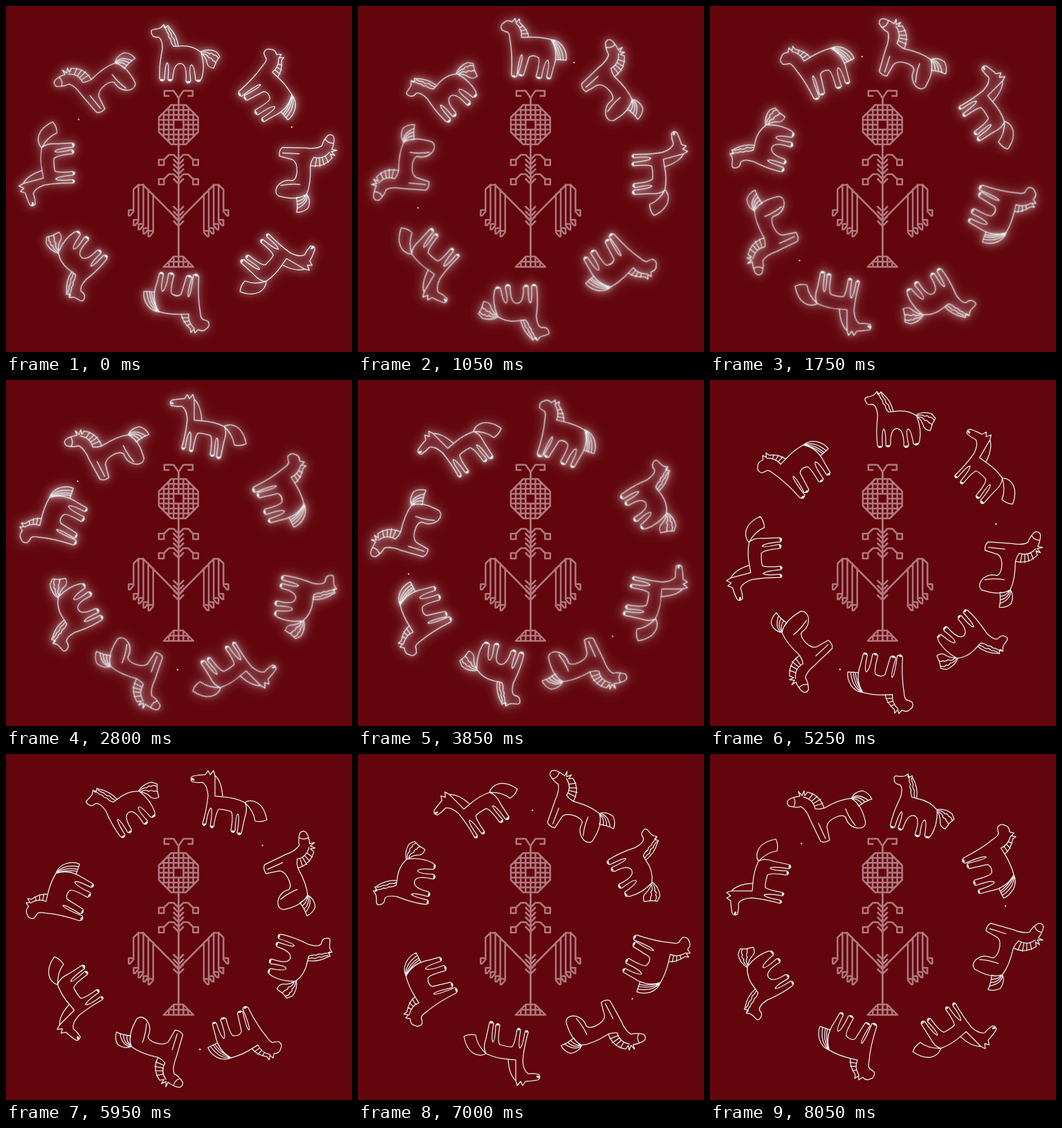
An HTML page that plays this animation: 500x500 px, repeating every 8.4 s.

```html
<!DOCTYPE html>
<html lang="en">
<head>
<meta charset="utf-8">
<title>Horse carousel</title>
<style>
  html, body { margin: 0; width: 100%; height: 100%; overflow: hidden; background: #62050c; }
  svg { display: block; width: 100vw; height: 100vh; fill: none; stroke-linecap: round; stroke-linejoin: round; }
  #herd { stroke: #e6f3f3; stroke-width: 1.25; }
  #herd.glow { filter: drop-shadow(0 0 3px #fff9) drop-shadow(0 0 8px #fffc); }
  .hoof { stroke-width: 2.8; }
  #ornament { stroke: #b0777e; stroke-width: 2.5; }
</style>
</head>
<body>
<svg viewBox="0 0 500 500">
  <g id="ornament" transform="translate(249.3 0)"></g>
  <g id="wheel">
    <g id="herd"></g>
    <circle cx="105" cy="164" r="1.1" fill="#fff"/>
    <circle cx="413" cy="175" r="1.1" fill="#fff"/>
  </g>
</svg>
<script>
const STEP = 350, STEPS = 24, GLOW_STEPS = 15;
const $ = id => document.getElementById(id);

// Each horse: pivot, outline, hooves, and its places as [x, y, rotation]
const horses = [
  { // wavy mane and tail
    pivot: [250, 70],
    lines: `M212 43Q207 35 213 34Q221 33 224 31L228 27L230 32L234 28L236 31Q247 42 249 58
      Q269 56 282 67Q288 87 283 104Q279 112 274 107Q272 85 268 85Q264 86 267 108Q264 114 260 109
      Q262 84 252 83Q242 83 241 105Q238 111 234 106Q236 84 233 82Q230 84 229 106Q225 111 222 105
      Q221 86 226 62Q226 47 220 45Q215 46 212 43
      M231 33Q232 38 235 41Q234 45 238 48Q238 53 242 58H249M234 31Q236 37 239 40Q238 44 243 48Q243 53 246 58
      M281 66Q292 61 304 66L309 73L304 80L300 90Q291 89 290 80Q288 73 283 69
      M283 67Q290 65 294 69Q298 67 300 71Q304 70 307 76M284 69Q291 69 293 75Q297 74 299 79Q302 79 303 83`,
    hooves: "M224 107h2M236 107h2M262 110h3M277 108h3M229 30l1 1",
    places: [[250, 70, 0], [101.9, 374.2, 220]]
  },
  { // broad legs, striped mane
    pivot: [168, 88],
    lines: `M112 76Q106 69 115 65Q123 62 128 62L126 55L131 61L134 54L135 61L139 56Q157 60 163 79
      Q186 66 202 65Q217 72 223 100Q222 108 212 108Q198 106 194 92Q190 88 180 92Q167 98 167 106L171 125
      Q164 130 158 127L143 96Q138 82 130 77Q122 79 112 76
      M119 64Q123 71 119 77M133 63Q147 66 150 80Q156 81 163 79
      M141 66L147 58M145 69L153 62M148 72L158 66M149 76L161 72
      M155 101L165 123M194 80Q199 93 208 104
      M202 65Q207 55 219 54Q228 57 232 66Q222 69 213 76Q210 69 202 65
      M203 64Q213 57 227 68M204 65Q214 61 222 70M205 66Q212 65 218 73`,
    hooves: "",
    places: [[429.5, 231, 117], [130.5, 113.5, -15]]
  },
  { // striped tail, legs in pairs
    pivot: [205, 80],
    lines: `M156 62Q151 56 156 51Q159 45 167 47L170 41L173 46L176 40L178 45Q192 52 196 62
      Q212 57 228 57Q244 71 242 95L242 111Q239 115 236 111Q235 88 231 87Q227 90 229 114Q225 118 221 114
      Q221 89 217 87Q208 84 204 90L203 117Q199 121 195 117Q196 90 193 89Q190 92 194 121Q190 126 186 121
      Q180 92 171 73Q167 61 162 63L156 62
      M173 47Q185 54 186 65L196 62M180 52L184 48M183 56L190 52M185 60L194 57
      M228 57Q239 55 248 63Q256 71 257 80L242 83Q240 67 228 57
      M230 57Q246 61 253 81M231 58Q244 66 249 82M231 59Q242 70 246 82`,
    hooves: "M189 122h2M198 118h2M224 115h2M238 112h2",
    places: [[381.5, 119.5, 60], [249.5, 425.8, 195]]
  },
  { // pointed muzzle, plain tail
    pivot: [315, 70],
    lines: `M269 40Q265 35 270 32Q281 30 288 30L292 24L295 30L300 24L302 31Q312 40 313 62
      Q330 63 345 70Q350 78 345 92L340 115Q337 119 334 114Q338 91 335 87Q332 87 331 111Q328 116 325 111
      Q329 87 325 83Q311 79 307 80Q303 86 300 105Q297 109 295 104Q299 81 296 78Q292 81 289 101Q286 106 284 101
      Q290 80 292 60Q291 45 284 41Q277 42 269 40
      M302 31V61L313 62M345 70Q354 65 364 71Q374 78 377 95Q370 99 360 97Q358 82 345 70`,
    hooves: "M286 102h1M297 105h1M327 112h2M336 115h2M269 36l2 1",
    places: [[391, 371.8, 120], [59.3, 233.8, 255]]
  }
];

$("herd").innerHTML = horses.map(({ pivot: [px, py], lines, hooves, places }) =>
  places.map(([x, y, turn]) =>
    `<g transform="translate(${x} ${y}) rotate(${turn}) translate(${-px} ${-py})">
      <path d="${lines}"/><path class="hoof" d="${hooves}"/></g>`).join("")).join("");

// Left half of the embroidered flower; the right half mirrors it
function halfFlower() {
  let d = "M-14 130H-20.5V122.5H-7L0 133V142";
  d += "M0 143H-10.5L-28.4 161V182L-10.5 200H0V362";
  for (let i = -3; i <= 3; i++) {
    const reach = Math.min(28.4, 39 - Math.abs(i * 7.1));
    d += `M0 ${171.5 + i * 7.1}h${-reach}`;
    if (i <= 0) d += `M${i * 7.1} ${171.5 - reach}v${2 * reach}`;
  }
  for (const y of [222, 250]) d += `M0 ${y}L-7 ${y - 7}H-14L-21 ${y}h-7.5v8h7.5v-8`;
  for (let y = 222; y <= 250; y += 7) d += `M-7 ${y}l7 7`;
  for (let y = 295; y <= 316; y += 7) d += `M-7 ${y - 5}l7 7`;
  d += "M0 310L-51 258.5H-58L-65 265";
  [[265, 295], [258, 309], [258, 315], [265, 321], [272, 325]].forEach(([top, end], i) => {
    d += `M${-65 + 7.1 * i} ${top}V${end}h-7v8h2l5-6v-2`;
  });
  return d + "M0 362H-7L-21.5 377H0M0 369.5H-14M-7 362V377M-14 369.5V377M0 362V377";
}
const half = `<path d="${halfFlower()}"/>`;
$("ornament").innerHTML = half + `<g transform="scale(-1 1)">${half}</g>
  <rect x="-7.1" y="164.4" width="14.2" height="14.2" fill="#62050c"/>`;

function draw() {
  const step = Math.floor(performance.now() / STEP) % STEPS;
  $("wheel").setAttribute("transform", `rotate(${-360 / STEPS * step} 250 250)`);
  $("herd").classList.toggle("glow", step < GLOW_STEPS);
  requestAnimationFrame(draw);
}
draw();
</script>
</body>
</html>
```
